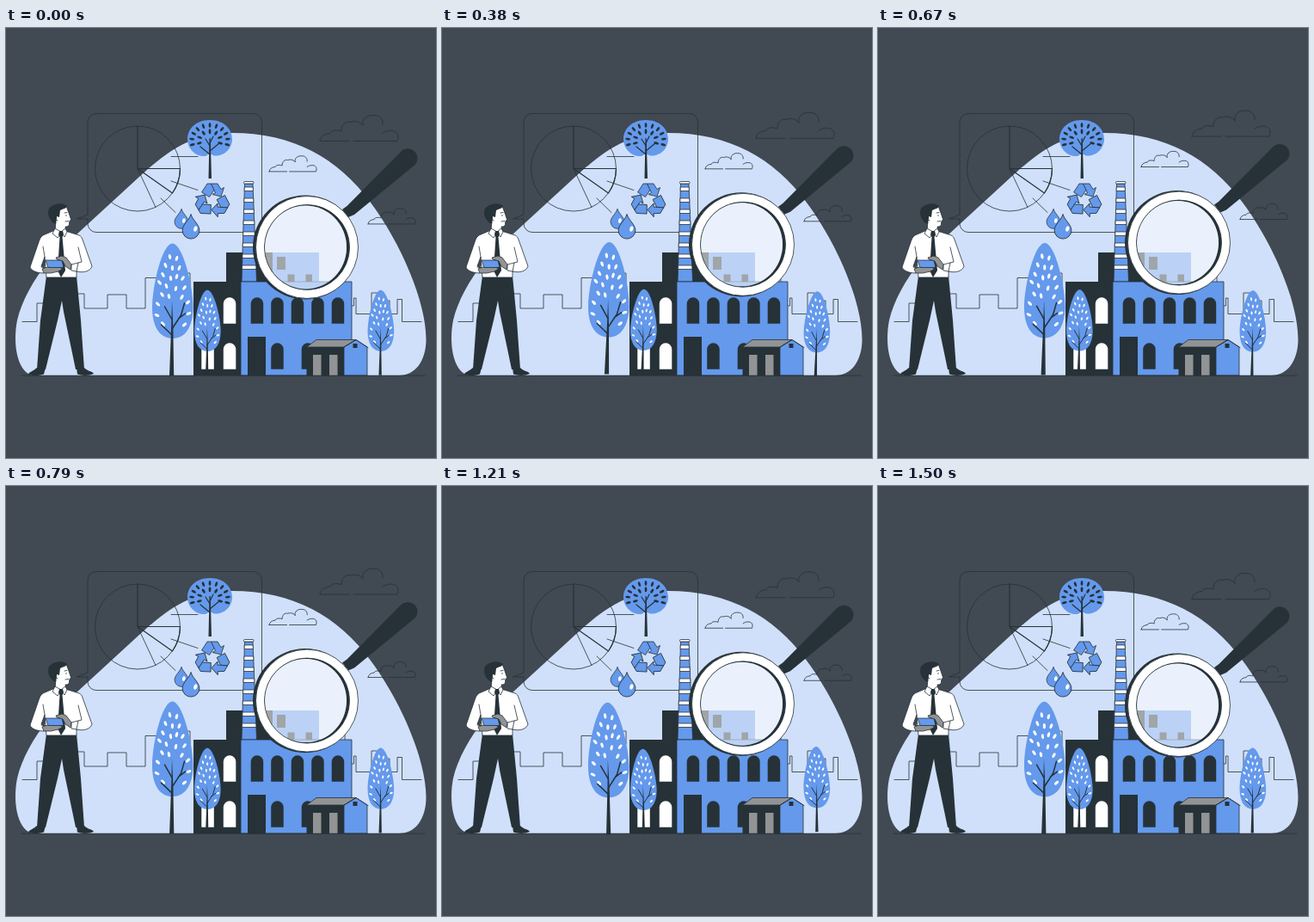
Recreate the animation shown at these times as an HTML page. Size 500x500 px, loop 1540 ms.

```html
<!DOCTYPE html>
<html lang="en">
<head>
<meta charset="utf-8">
<title>Factory inspection</title>
<style>
html, body { margin: 0; width: 100%; height: 100%; overflow: hidden; background: #414952; }
svg { display: block; width: 100vw; height: 100vh; }
.ink { fill: #263238; }
.blue { fill: #6499ec; }
.pale { fill: #d0e0fa; }
.white { fill: #fff; }
.grey { fill: #919394; }
.line { fill: none; stroke: #263238; stroke-width: .8; stroke-linejoin: round; stroke-linecap: round; }
.edge { stroke: #263238; stroke-width: .8; stroke-linejoin: round; }
</style>
</head>
<body>
<svg viewBox="0 0 500 500">
  <defs>
    <path id="cloud" class="line" vector-effect="non-scaling-stroke" d="M0 30.5H34M39 30.5H90C93 23 89 18 82 18.5C78 18.5 75 20 73 21.500M0 30.500C1 25 5 22 12 21.500C13 18 18 17 25 19C25 11 30 7 36 8.500C42 6 48 9 50 12.500C48 4 56 0 62 .5C69 0 74 5 73 11"/>
    <path id="arch" d="M0 30.500V7.250A7.250 7.250 0 0 1 14.500 7.250V30.500Z"/>
    <g id="tree">
      <path class="blue" d="M0-76.500C12-76.500 24-27 24-2C24 20 15 34 .5 34C-15 34-23.500 20-23.500-2C-23.500-27-12-76.500 0-76.500Z"/>
      <g id="leaves" class="white"></g>
      <path class="ink" d="M-3.500 77L-1.300 20L-.5-10L.8 20L1.700 77Z"/>
      <path class="line" style="stroke-width:1.500" d="M-.5 23L10 7L14-7M7 11L15 5M-.5 12L-9-3M-.5 30L-13 18"/>
    </g>
    <g id="arrow" class="blue edge">
      <path d="M-12.500-9.500L-6-19.500H-1.500L2.500-13L-3.500-4Z"/>
      <path d="M-1.500-19.500H6L10-13L13.500-15L10-4.500L0-7L3.500-9Z"/>
    </g>
    <path id="drop" class="blue edge" d="M0-14C1.500-8 9-3 9 3A9 9 0 0 1-9 3C-9-3-1.500-8 0-14Z"/>
  </defs>

  <rect width="500" height="500" fill="#414952"/>
  <path class="pale" d="M30 404C12 398 8 365 13 340C18 318 32 292 50 271C60 259 72 249 81 241L155 173C190 141 218 122 262 122C334 122 386 151 424 203C459 250 488.500 318 488.500 362C488.500 387 476 404 457 404Z"/>
  <path class="line" d="M19 341.500H36V320H57V309H91V326H118V310H140V326H162V290.500H190V285H214V300M394 288V295M402 323H404.500V314H407V332.500H425V308H433V317H446V332.500H455V315.500H460.500V341.500H483"/>

  <g class="line">
    <path d="M105 99.500H287.500A10 10 0 0 1 297.500 109.500V227.500A10 10 0 0 1 287.500 237.500H105A10 10 0 0 1 95 227.500V222H82.500L95 217V109.500A10 10 0 0 1 105 99.500Z"/>
    <circle cx="153" cy="163.500" r="49.500"/>
    <path d="M153 163.500L174 208.500M192 149.500H223M192 178L223 188.500M180 198L197 214.500"/>
    <path style="stroke-width:1.200" d="M153 114V163.500H202.500M153 163.500L193.500 192A49.500 49.500 0 0 0 202.500 163.500"/>
  </g>

  <path class="blue" d="M237 107C254 107 263 118 263 129C263 141 253 149.500 242 148.500L237 146L232 149C221 150 211 141 211 129C211 118 220 107 237 107Z"/>
  <g id="dots" class="ink"></g>
  <path class="ink" d="M235.500 175L236.500 128H237.700L239 175Z"/>
  <path class="line" style="stroke-width:1.200" d="M237 147L226 138M237 143L248 134M237 137L232 129M237 134L241 126"/>

  <g id="recycle" transform="translate(240 200.500)"></g>
  <use href="#drop" transform="translate(204 222.700) scale(.885)"/>
  <ellipse class="white" cx="206.800" cy="224" rx="1.800" ry="2.800" transform="rotate(15 206.800 224)"/>
  <use href="#drop" transform="translate(215 231.900) scale(1.100)"/>
  <ellipse class="white" cx="220.300" cy="233.500" rx="2" ry="3.200" transform="rotate(15 220.300 233.500)"/>

  <g id="clouds"></g>

  <path class="ink" d="M256 261H310V296H256Z"/>
  <path class="blue" d="M310 261H364V296H310Z"/>
  <path class="ink" d="M315 266H325V281H315ZM327.500 286.500H335.500V296H327.500ZM348.500 286.500H356V296H348.500Z"/>
  <g id="stack"></g>
  <path class="ink" d="M218 295H273V404H218Z"/>
  <path class="blue edge" d="M273 295H402V404H273Z"/>
  <g id="windows"></g>
  <path class="ink" d="M281 359H302V404H281Z"/>

  <path class="ink" d="M349.500 371H393V404H349.500Z"/>
  <path class="blue edge" d="M393 371L407 362.500L420 371V404H393Z"/>
  <path class="grey edge" d="M349.500 371L361 362.500H407L393 371Z"/>
  <path class="grey" d="M357 380H366.500V404H357ZM376 380H385.500V404H376Z"/>
  <path class="ink" d="M403.500 367H408.500V372H403.500Z"/>
  <path class="line" d="M393 371L407 362.500L421 371.500M18 404.200H487"/>

  <g id="trees"></g>

  <g id="man">
    <path class="ink" d="M47 288H82L87 340L91 397H81L67 330L65 317L60 340L46 397H36L40 340Z"/>
    <path class="ink" d="M36 395H46L44 402.500C38 404.500 30 404.500 26 403C26 400 32 399 36 395ZM82 395H91C94 399 101 399 102 402C97 404.500 88 404.500 83 402.500Z"/>
    <path class="white edge" d="M57 235L43 241C40 243 39 246 38 249L28 278C29 282 36 285 44 285L46 279L41 277L45 266L47 290H82L82 283C90 285 98 283 100 277L89 246C88 243 87 242 85 241L69 236Z"/>
    <path class="line" d="M45 266L43 254M82 283L84 273L88 272L84 255M84 273L76 275V282L82 283M46 279L41 278"/>
    <path class="white edge" d="M58 224L57 236L64 243L70 237L69 231C73 231 74 229 73.500 226L75.500 222.500L73 215L70 207L58 209Z"/>
    <path class="ink" d="M58 228C51 225 47 217 50 210C54 204 66 202 71 207C69 211 66 210 63 212L62 220L59 219Z"/>
    <path class="line" d="M68 215L71 214.500M70 217.500V218.500M69 225L73 224.500M59 220C57 218 57 223 60 224"/>
    <path class="white edge" d="M57 233L54 239L60 244L64 238L68 243L71 237L69 233L64 237Z"/>
    <path class="ink" d="M62 236H66L67 240L65.500 243L69 282L64 290L60 282L62.500 243L61 240Z"/>
    <path class="grey edge" d="M44 285L42 280L48 278H62L66 280L61 283L52 285Z"/>
    <path class="blue edge" d="M46 270H65L67 278.500H49Z"/>
    <path class="grey edge" d="M58 267L65 265L70 267L76 275L75 281L69 277L66 271L59 269Z"/>
  </g>

  <g id="glass">
    <path class="ink" d="M391 211L396.500 207L459.500 143.500A11 11 0 0 1 475 159.500L405 217L398 220Z"/>
    <path class="ink" fill-rule="evenodd" d="M287 255A61 60.500 0 1 1 409 255A61 60.500 0 1 1 287 255ZM301 255A47.500 48.500 0 1 0 396 255A47.500 48.500 0 1 0 301 255Z"/>
    <path class="white edge" fill-rule="evenodd" d="M290.500 255A59.500 59.500 0 1 1 409.500 255A59.500 59.500 0 1 1 290.500 255ZM300.500 255A49.500 49.500 0 1 0 399.500 255A49.500 49.500 0 1 0 300.500 255Z"/>
    <ellipse cx="348.500" cy="255" rx="47.500" ry="48.500" fill="#fff" fill-opacity=".56"/>
  </g>
</svg>
<script>
const LOOP = 1540;
const $ = id => document.getElementById(id);
const NS = "http://www.w3.org/2000/svg";

function add(parent, tag, attrs) {
  const el = document.createElementNS(NS, tag);
  for (const k in attrs) el.setAttribute(k, attrs[k]);
  return $(parent).appendChild(el);
}

function leaf(parent, x, y, turn, rx, ry) {
  add(parent, "ellipse", { rx, ry, transform: `translate(${x} ${y}) rotate(${turn})` });
}

const leafSpots = [
  [-3, -61], [5, -59], [-8, -51], [0, -48], [8, -48], [-11, -40], [-2, -36], [5, -38],
  [12, -36], [-15, -31], [-7, -27], [4, -24], [14, -25], [-12, -17], [-4, -15], [11, -14],
  [-17, -6], [18, -8], [-18, 7], [19, 5], [-11, 17], [14, 18]
];
for (const [x, y] of leafSpots) leaf("leaves", x, y, x * 2.6 + (y > 0 ? x : 0), 1.6, 3.1);

// Fans of dark leaves in the round crown
for (const [r, n] of [[12, 7], [20, 11]]) {
  for (let i = 0; i < n; i++) {
    const a = -195 + 210 * i / (n - 1), q = a * Math.PI / 180;
    leaf("dots", 237 + r * 1.05 * Math.cos(q), 131 + r * .9 * Math.sin(q), a + 90, 1.4, 3);
  }
}

for (const a of [0, 120, 240]) add("recycle", "use", { href: "#arrow", transform: `rotate(${a})` });

add("stack", "path", { class: "blue edge", d: "M277.500 181H287L291.500 295H274Z" });
for (let i = 0; i < 8; i++) {
  const y = 185 + i * 13, l = 277.4 - (y - 181) * .03, r = 287 + (y - 181) * .039;
  add("stack", "path", { class: "white edge", "stroke-width": .5, d: `M${l} ${y}H${r}L${r + .2} ${y + 4.5}H${l - .1}Z` });
}
add("stack", "rect", { class: "white edge", x: 276.5, y: 178.5, width: 11.5, height: 2.5, rx: 1 });

function arch(x, y, cls) {
  add("windows", "use", { href: "#arch", class: cls, transform: `translate(${x} ${y})` });
}
for (let i = 0; i < 5; i++) arch(284.7 + i * 23.5, 313.3, "ink");
for (const x of [308.2, 343.7]) arch(x, 366.3, "ink");
for (const y of [313.3, 366.3]) for (const x of [227.3, 252.8]) arch(x, y, "white");

const clouds = [[365, 101, 1], [306, 148.5, .605], [421, 209.5, .605]];
for (const [x, y, s] of clouds) add("clouds", "use", { href: "#cloud", transform: `translate(${x} ${y}) scale(${s})` });

// x, y, scale, lift, tilt
const trees = [[193.5, 327, 1, -1.4, .8], [234.2, 354, .645, -1, .8], [435.7, 354, .645, 1.6, .9]]
  .map(([x, y, s, lift, tilt]) => ({ x, y, s, lift, tilt, el: add("trees", "use", { href: "#tree" }) }));

function draw(t) {
  const w = 2 * Math.PI / LOOP;
  const bob = -2.75 * (1 - Math.cos(w * (t + 40)));
  const sway = Math.sin(w * t);
  for (const id of ["clouds", "glass"]) $(id).setAttribute("transform", `translate(0 ${bob})`);
  for (const k of trees)
    k.el.setAttribute("transform", `translate(${k.x} ${k.y + k.lift * sway}) rotate(${k.tilt * sway}) scale(${k.s})`);
}

const start = performance.now();
function tick() {
  draw((performance.now() - start) % LOOP);
  requestAnimationFrame(tick);
}
tick();
</script>
</body>
</html>
```
